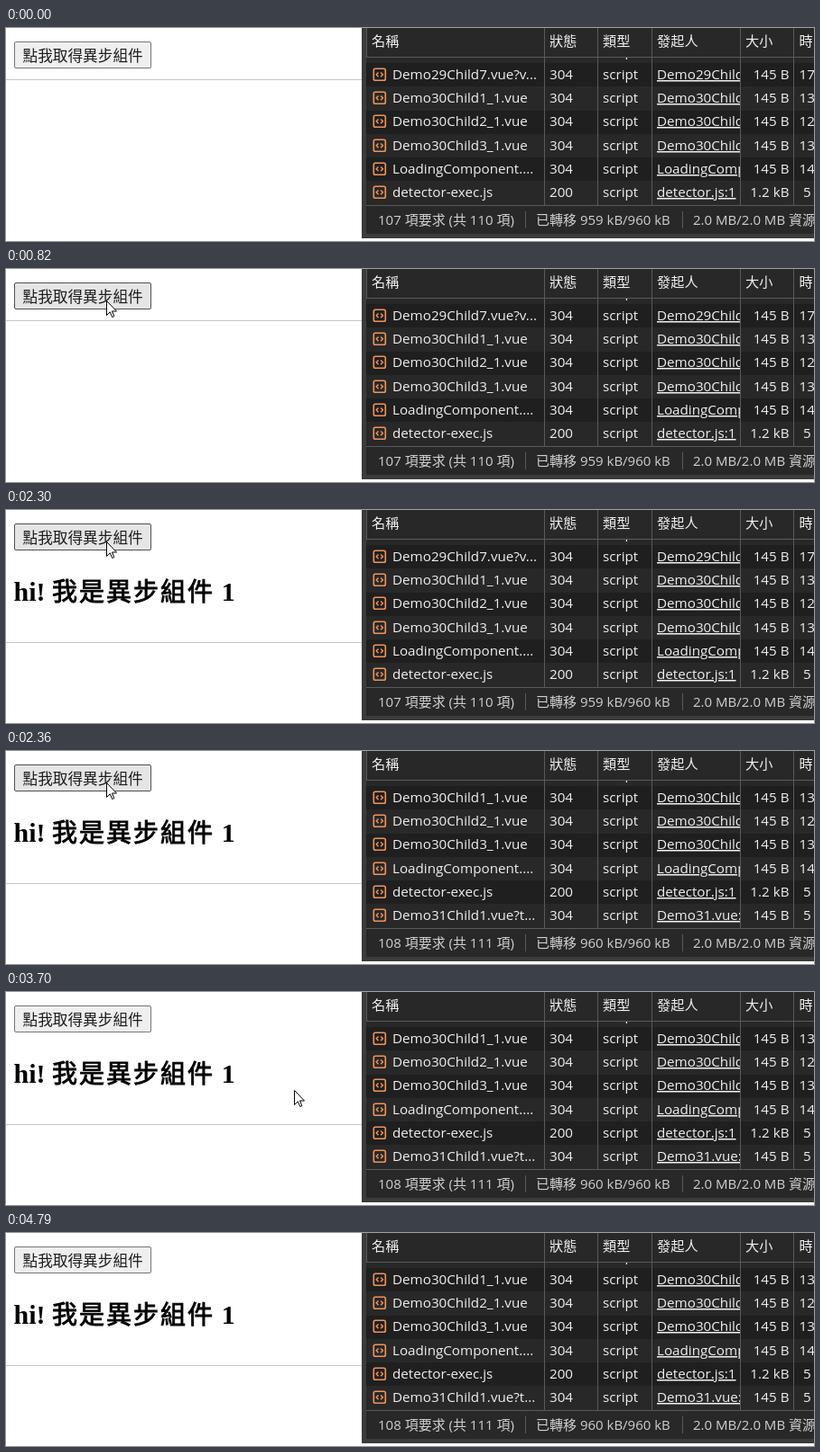
An HTML page that plays this animation: 895x237 px, repeating every 5650 ms.

```html
<!DOCTYPE html>
<html lang="zh-Hant">
<head>
<meta charset="utf-8">
<title>異步組件</title>
<style>
  html, body { margin: 0; width: 100%; height: 100%; overflow: hidden; background: #fff; }
  svg { display: block; }
  text { white-space: pre; }
  .ui { font: 15.2px "Open Sans", "Noto Sans CJK TC", "Noto Sans CJK", sans-serif; fill: #f0f0f0; }
  .ui.status { font-size: 15px; fill: #d0d0d0; }
  .link { text-decoration: underline; }
  .end { text-anchor: end; }
  .button { font: 16.67px "Noto Sans CJK TC", "Noto Sans CJK", sans-serif; fill: #1c1c1c; }
  .title { font: bold 30px "Liberation Serif", serif; fill: #000; }
  .title tspan {
    font: 28px "Noto Sans CJK TC", "Noto Sans CJK", sans-serif;
    letter-spacing: 2px; stroke: #000; stroke-width: 0.9;
  }
</style>
</head>
<body>
<svg id="stage" width="895" height="237" viewBox="0 0 895 237" xmlns="http://www.w3.org/2000/svg">
  <defs>
    <clipPath id="listClip"><rect x="399" y="33" width="496" height="164"/></clipPath>
    <clipPath id="linkClip"><rect x="716" y="-20" width="97" height="30"/></clipPath>
    <g id="icon" fill="none" stroke="#f0935c" stroke-width="1.6">
      <rect x="407.3" y="-11.7" width="13" height="13" rx="1.8"/>
      <path d="M412.5 -7.6l-2.3 2.4l2.3 2.4M415.1 -7.6l2.3 2.4l-2.3 2.4" stroke-width="1.4"/>
    </g>
  </defs>

  <rect id="rule" width="394" height="1" fill="#c6c6c6"/>
  <rect id="button" x="9.5" y="15.5" width="151" height="29" rx="1.5"/>
  <text class="button" x="18.5" y="37">點我取得異步組件</text>
  <text id="title" class="title" x="8.6" y="101">hi! <tspan>我是異步組件</tspan> 1</text>

  <rect x="394" width="501" height="234" fill="#3b3b3c"/>
  <rect x="399" width="496" height="229" fill="#282828"/>
  <g id="stripes" fill="#1f1f1f"></g>
  <g id="list" clip-path="url(#listClip)"></g>
  <g id="lines" fill="#5a5a5a">
    <rect x="399" width="1" height="32"/>
    <rect x="399" y="32" width="496" height="1"/>
    <rect x="399" y="197" width="496" height="1"/>
  </g>
  <g id="labels"></g>
  <path id="cursor" d="M.5 .5V16.5L4.3 12.8L6.7 18.5L8.8 17.6L6.5 12H11.5Z"
        fill="#fff" stroke="#000" stroke-linejoin="round"/>
</svg>
<script>
const LOOP = 5650, ROW = 26.25, STEP = 70;
const $ = id => document.getElementById(id);

function add(parent, tag, attrs, content) {
  const el = document.createElementNS('http://www.w3.org/2000/svg', tag);
  for (const key in attrs) el.setAttribute(key, attrs[key]);
  if (content) el.textContent = content;
  parent.appendChild(el);
  return el;
}
const label = (parent, x, y, content, cls = '', more = {}) =>
  add(parent, 'text', { x, y, class: 'ui ' + cls, ...more }, content);

// name, status, initiator, size, time
const requests = [
  ['Demo29Child7.vue?v...', 304, 'Demo29Child.vue:1', '145 B', 17],
  ['Demo30Child1_1.vue', 304, 'Demo30Child.vue:1', '145 B', 13],
  ['Demo30Child2_1.vue', 304, 'Demo30Child.vue:1', '145 B', 12],
  ['Demo30Child3_1.vue', 304, 'Demo30Child.vue:1', '145 B', 13],
  ['LoadingComponent....', 304, 'LoadingComponent.vue:1', '145 B', 14],
  ['detector-exec.js', 200, 'detector.js:1', '1.2 kB', 5],
  ['Demo31Child1.vue?t...', 304, 'Demo31.vue:12', '145 B', 5]
];

const rows = requests.map(([name, status, from, size, time]) => {
  const row = add($('list'), 'g', {});
  add(row, 'use', { href: '#icon' });
  label(row, 428, 0, name);
  label(row, 602, 0, status);
  label(row, 661, 0, 'script');
  label(row, 721, 0, from, 'link', { 'clip-path': 'url(#linkClip)' });
  label(row, 867.5, 0, size, 'end');
  label(row, time < 10 ? 883 : 878.5, 0, time + ' 毫秒');
  return row;
});
// Row scrolled under the header: only its descender shows
label($('list'), 661, 31, 'script');

for (const i of [0, 2, 4])
  add($('stripes'), 'rect', { x: 399, y: Math.round(39 + ROW * i), width: 496, height: 26 });
for (const x of [596, 655, 715, 813, 872])
  add($('lines'), 'rect', { x, y: 0, width: 1, height: 197 });
for (const x of [575, 749])
  add($('lines'), 'rect', { x, y: 204, width: 1, height: 19 });

[[405, '名稱'], [602, '狀態'], [661, '類型'], [721, '發起人'], [819, '大小'], [878.5, '時間']]
  .forEach(([x, s]) => label($('labels'), x, 20, s));
const count = label($('labels'), 412, 219, '', 'status');
const moved = label($('labels'), 587, 219, '', 'status');
label($('labels'), 761, 219, '2.0 MB/2.0 MB 資源', 'status');

// Pointer position, sampled every STEP ms while moving; null when off stage
const easeOut = p => 1 - (1 - p) ** 2;
const easeBoth = p => p * p * (3 - 2 * p);
const mix = (a, b, p) => a.map((v, i) => Math.round(v + (b[i] - v) * p));
const progress = (t, start, steps) =>
  Math.min(1, Math.floor((t - start) / STEP + 0.01) / steps);

function pointer(t) {
  if (t < 260 || t >= 4790) return null;
  if (t < 3360) return mix([794, 171], [111, 35], easeOut(progress(t, 260, 8)));
  if (t < 3910) return mix([120, 35], [518, 183], easeBoth(progress(t, 3360, 8)));
  if (t < 3980) return [518, 183];
  if (t < 4040) return [519, 185];
  if (t < 4440) return [521, 188];
  const p = progress(t, 4370, 5);
  return [Math.round(521 + 303 * p ** 1.3), Math.round(188 - 58 * p + 88 * p * p)];
}

function buttonStyle(t, at) {
  if (t >= 1150 && t < 1290) return ['#f5f5f5', '#8d8d8d'];
  const over = at && at[0] >= 9 && at[0] < 161 && at[1] >= 15 && at[1] < 45;
  return over ? ['#e5e5e5', '#4f4f4f'] : ['#efefef', '#767676'];
}

function draw(t) {
  const at = pointer(t), shown = t >= 2300, loaded = t >= 2360 ? 1 : 0;
  const [fill, stroke] = buttonStyle(t, at);
  $('button').setAttribute('fill', fill);
  $('button').setAttribute('stroke', stroke);
  $('title').setAttribute('visibility', shown ? 'visible' : 'hidden');
  $('rule').setAttribute('y', shown ? 147 : 57);
  rows.forEach((row, i) => {
    row.setAttribute('transform', `translate(0 ${Math.round(56.9 + ROW * (i - loaded))})`);
    row.setAttribute('visibility', i < loaded ? 'hidden' : 'visible');
  });
  count.textContent = `${107 + loaded} 項要求 (共 ${110 + loaded} 項)`;
  moved.textContent = `已轉移 ${959 + loaded} kB/960 kB`;
  $('cursor').setAttribute('visibility', at ? 'visible' : 'hidden');
  if (at) $('cursor').setAttribute('transform', `translate(${at})`);
}

const start = performance.now();
function tick() {
  draw((performance.now() - start) % LOOP);
  requestAnimationFrame(tick);
}
tick();
</script>
</body>
</html>
```
